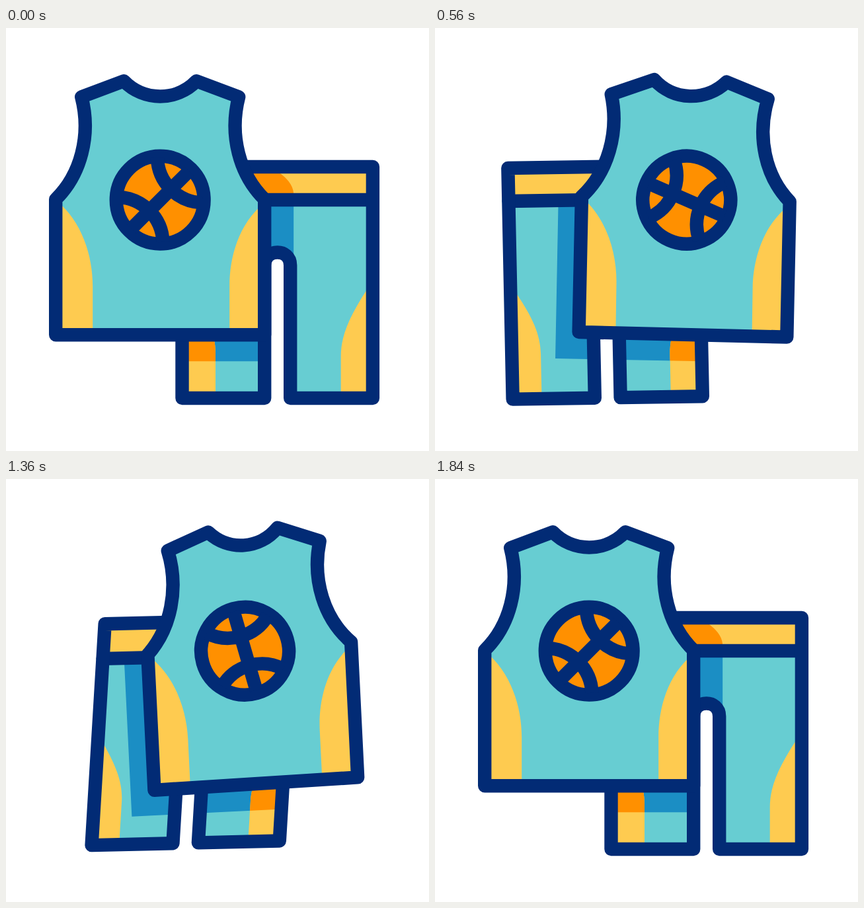
An HTML page that plays this animation: 640x640 px, repeating every 2000 ms.

```html
<!DOCTYPE html>
<html lang="en">
<head>
<meta charset="utf-8">
<title>Basketball uniform</title>
<style>
  html, body { margin: 0; width: 100%; height: 100%; overflow: hidden; background: #fff; }
  svg { display: block; width: 100%; height: 100%; }
  .teal { fill: #67cdd2; }
  .blue { fill: #1b8ec4; }
  .yellow { fill: #fecb50; }
  .orange { fill: #ff9000; }
  .line { stroke: #022b75; stroke-width: 20.4; stroke-linejoin: round; stroke-linecap: round; }
  path.line { fill: none; }
  #ball path { stroke-linecap: butt; }
</style>
</head>
<body>
<svg viewBox="0 0 640 640">
  <defs>
    <clipPath id="shortsClip"><path data-part="shorts"/></clipPath>
    <clipPath id="shadowClip"><path data-part="shadow"/></clipPath>
  </defs>
  <g clip-path="url(#shortsClip)">
    <path class="teal" data-part="shorts"/>
    <path class="blue" data-part="shadow"/>
    <path class="yellow" data-part="trim"/>
    <g clip-path="url(#shadowClip)"><path class="orange" data-part="trim"/></g>
  </g>
  <path class="line" data-part="belt"/>
  <path class="line" data-part="shorts"/>
  <path class="teal" data-part="jersey"/>
  <path class="yellow" data-part="sides"/>
  <path class="line" data-part="jersey"/>
  <g id="ball">
    <circle class="orange line" r="66.4"/>
    <path class="line" d="M-62,0H62M42,-48A70,70 0 0 0 42,48M-42,-48A70,70 0 0 1 -42,48"/>
  </g>
</svg>
<script>
const LOOP = 2000, STEP = 40, LAST = 1840, MID_Y = 260.2;

// Outlines at rest, relative to the centre of each garment.
const jersey = 'M-158,-1 C-120,-38 -104,-98 -119,-156 L-55,-180 C-25,-149 25,-149 55,-180 ' +
  'L119,-156 C104,-98 120,-38 158,-1 L158,204 L-158,204 Z';
const sides = 'M-158,0 C-118,32 -102,85 -102,130 L-102,204 L-158,204 Z ' +
  'M158,4 C118,36 105,88 105,130 L105,204 L158,204 Z';
const shadow = 'M-195,0 L-195,244 L202,244 L202,-10 C201,-24 190,-34 182,-40 L160,-60 L0,-60 L0,0 Z';
const shorts = 'M-144.2,-50 L144.2,-50 L144.2,300 L19.5,300 L19.5,99 ' +
  'C19.5,73 -19.5,73 -19.5,99 L-19.5,300 L-144.2,300 Z';

const clamp = v => Math.min(1, Math.max(0, v));
const smooth = p => p * p * (3 - 2 * p);
const bell = p => Math.sin(Math.PI * p) ** 2;

// Travel from 0 to 1 and back; out and back are the lean of each trip.
function trip(t, outStart, outEnd, backStart, backEnd) {
  const p = clamp((t - outStart) / (outEnd - outStart));
  const r = clamp((t - backStart) / (backEnd - backStart));
  return { at: smooth(p) - smooth(r), out: bell(p), back: bell(r) };
}

const spinTimes = [40, 360, 560, 800, 1200, 1520, 1840];
const spinAngles = [0, 31.8, 68.6, 136.5, 259, 330, 360];

function spin(t) {
  const T = spinTimes, A = spinAngles, end = T.length - 1;
  if (t <= T[0]) return A[0];
  if (t >= T[end]) return A[end];
  const slope = i => i === 0 || i === end ? 0 : (A[i + 1] - A[i - 1]) / (T[i + 1] - T[i - 1]);
  const i = T.findIndex((time, n) => t < T[n + 1]);
  const span = T[i + 1] - T[i], p = (t - T[i]) / span;
  return A[i] + (A[i + 1] - A[i]) * smooth(p) +
    span * p * (1 - p) * (slope(i) * (1 - p) - slope(i + 1) * p);
}

function jerseyWarp({ at, out, back }, shift = 0, tilt = 1) {
  const cx = 233.2 + 156.1 * at + shift * out;
  return (x, y) => [
    cx + x + out * (-8.2 - 0.1665 * y + 0.000256 * y * y - 0.022 * x)
      + back * (12 + 0.088 * y - 0.047 * x - 0.0007 * Math.max(x, 0) * (158 - x)),
    MID_Y + y + out * (-2 + tilt * x * (0.13 + 1.3e-6 * Math.min(y, 0) ** 2))
      + back * (-5.5 - tilt * 0.11 * x)
  ];
}

function shortsWarp({ at, out, back }) {
  const cx = 410.7 - 160 * at;
  return (x, y) => [
    cx + x + out * (-7 - 0.04 * x + 0.194 * y) + back * (17.6 - 0.026 * x - 0.103 * y),
    MID_Y - 0.2 + y + out * (-2 - 0.139 * x - 0.01 * y) + back * (6.6 - 0.0416 * x - 0.077 * y)
  ];
}

function draw(part, outline, warp) {
  const d = outline.replace(/(-?[\d.]+),(-?[\d.]+)/g,
    (_, x, y) => warp(+x, +y).map(v => v.toFixed(2)).join(','));
  document.querySelectorAll(`[data-part="${part}"]`).forEach(el => el.setAttribute('d', d));
}

function render(t) {
  const top = trip(t, 75, 640, 1200, 1796);
  const bottom = trip(t, 55, 620, 1200, 1796);
  const wearTop = jerseyWarp(top), wearBottom = shortsWarp(bottom);

  const beltY = (9 * bottom.back).toFixed(2);
  const inset = -93.7 - 6 * (bottom.at + bottom.out + bottom.back);
  const left = inset.toFixed(2), bulge = (inset - 12).toFixed(2);
  const trim = `M-145,-50 L145,-50 L145,${beltY} L-145,${beltY} Z ` +
    `M134,138 C109,177 96,205 96,237 L96,300 L145,300 L145,120 Z ` +
    `M-134,142 C${bulge},176 ${left},202 ${left},232 L${left},300 L-145,300 L-145,125 Z`;

  draw('jersey', jersey, wearTop);
  draw('sides', sides, wearTop);
  draw('shadow', shadow, jerseyWarp(top, 9, 0.8));
  draw('shorts', shorts, wearBottom);
  draw('trim', trim, wearBottom);
  draw('belt', `M-144,${beltY} L144,${beltY}`, wearBottom);

  document.getElementById('ball').setAttribute('transform',
    `translate(${233.2 + 156.1 * top.at} ${MID_Y}) rotate(${spin(t) - 45})`);
}

const start = performance.now();
function tick() {
  const t = (performance.now() - start) % LOOP;
  render(Math.min(LAST, Math.floor((t + 1) / STEP) * STEP));
  requestAnimationFrame(tick);
}
tick();
</script>
</body>
</html>
```
